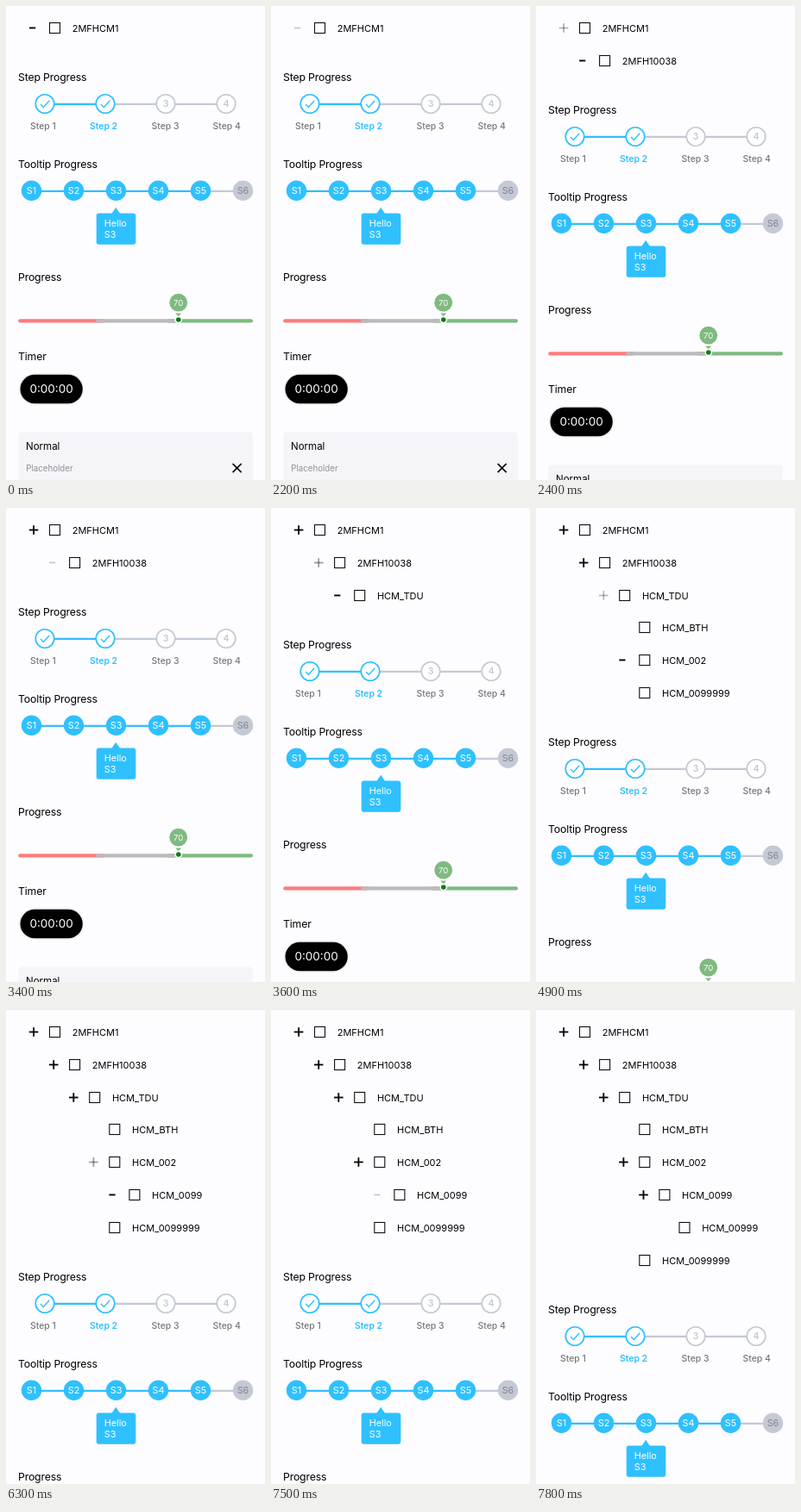
Recreate the animation shown at these times as an HTML page with a canvas. Size 300x550 px, loop 8 s.

```html
<!DOCTYPE html>
<html lang="en">
<head>
<meta charset="utf-8">
<title>Tree and progress widgets</title>
<style>
html, body { margin: 0; width: 100%; height: 100%; overflow: hidden; background: #fdfcff; }
canvas { display: block; width: 300px; height: 550px; }
</style>
</head>
<body>
<canvas id="stage"></canvas>
<script>
const W = 300, H = 550, LOOP = 8000, STEP = 100;
const ROW = 37.8, INDENT = 23.1;
const BG = '#fdfcff', BLUE = '#2fc0ff', GRAY = '#c4c9d6', GREEN = '#7fba80';

const canvas = document.getElementById('stage');
const ctx = canvas.getContext('2d');
const dpr = window.devicePixelRatio || 1;
canvas.width = W * dpr;
canvas.height = H * dpr;

// Depth-first tree; press dims the sign, open reveals the children.
const tree = [
  { label: '2MFHCM1', level: 0, shown: 0, press: 2200, fade: 2340, open: 2400 },
  { label: '2MFH10038', level: 1, shown: 2400, press: 3400, fade: 3515, open: 3600 },
  { label: 'HCM_TDU', level: 2, shown: 3600, press: 4800, fade: 4850, open: 4900 },
  { label: 'HCM_BTH', level: 3, shown: 4900 },
  { label: 'HCM_002', level: 3, shown: 4900, press: 6100, fade: 6215, open: 6300 },
  { label: 'HCM_0099', level: 4, shown: 6300, press: 7500, fade: 7550, open: 7600 },
  { label: 'HCM_00999', level: 5, shown: 7600 },
  { label: 'HCM_0099999', level: 3, shown: 4900 }
];

function text(str, x, mid, size, color = '#000', weight = 400, align = 'left', spacing = 0) {
  ctx.font = `${weight} ${size}px Inter, Roboto, sans-serif`;
  ctx.letterSpacing = spacing + 'px';
  ctx.textAlign = align;
  ctx.fillStyle = color;
  ctx.fillText(str, x, mid + size * 0.364);
}

function title(str, mid) {
  text(str, 14, mid, 12.3, '#000', 400, 'left', -0.18);
}

function rect(x, y, w, h, color, r = 0) {
  ctx.fillStyle = color;
  ctx.beginPath();
  ctx.roundRect(x, y, w, h, r);
  ctx.fill();
}

function disc(x, y, r, color) {
  ctx.fillStyle = color;
  ctx.beginPath();
  ctx.arc(x, y, r, 0, Math.PI * 2);
  ctx.fill();
}

function path(points, color, width) {
  ctx.beginPath();
  for (const [x, y] of points) ctx.lineTo(x, y);
  if (width) {
    ctx.strokeStyle = color;
    ctx.lineWidth = width;
    ctx.stroke();
  } else {
    ctx.fillStyle = color;
    ctx.fill();
  }
}

function signAlpha(node, t) {
  if (t < node.press) return 1;
  const p = Math.min(1, Math.max(0, (t - node.fade) / 250));
  const eased = p < 0.5 ? 2 * p * p : 1 - 2 * (1 - p) ** 2;
  return 0.2 + 0.8 * eased;
}

function drawRow(node, index, t) {
  const x = node.level * INDENT;
  const y = 25.5 + Math.round(index * ROW);
  if (node.open) {
    ctx.globalAlpha = signAlpha(node, t);
    if (t < node.open) {
      rect(x + 27, y - 1, 7.2, 1.9, '#000');
    } else {
      rect(x + 26.8, y - 0.9, 10.6, 1.8, '#000');
      rect(x + 31.2, y - 5.3, 1.8, 10.6, '#000');
    }
    ctx.globalAlpha = 1;
  }
  ctx.strokeStyle = '#111';
  ctx.lineWidth = 1.1;
  ctx.strokeRect(x + 50.5, y - 6, 12, 12);
  text(node.label, x + 76.7, y + 0.4, 11);
}

function drawSteps() {
  title('Step Progress', 83);
  const labelX = [28, 97, 168.5, 239.5];
  for (let i = 0; i < 4; i++) {
    const x = 45 + i * 70, y = 113.5, done = i < 2;
    const color = done ? BLUE : GRAY;
    if (i < 3) rect(x + 11, y - 0.7, 48, 2.3, i < 1 ? BLUE : GRAY);
    disc(x, y, 11.6, color);
    disc(x, y, 9.9, '#fff');
    if (done) path([[x - 5, y + 0.6], [x - 1.6, y + 4], [x + 5.2, y - 3.8]], BLUE, 1.4);
    else text(String(i + 1), x, y, 10.5, GRAY, 600, 'center');
    const active = i === 1;
    text('Step ' + (i + 1), labelX[i], 139.3, 10.4, active ? BLUE : '#77777b', active ? 600 : 500);
  }
}

function drawTooltip() {
  title('Tooltip Progress', 184);
  const y = 214.2;
  rect(29.5, y - 0.5, 196, 2.3, BLUE);
  rect(225.5, y - 0.5, 49, 2.3, GRAY);
  for (let i = 0; i < 6; i++) {
    const x = 29.5 + i * 49, last = i === 5;
    disc(x, y, 11.7, last ? GRAY : BLUE);
    text('S' + (i + 1), x, y, 10.8, last ? '#85858a' : '#fff', 400, 'center');
  }
  path([[122.3, 241], [127.2, 233.8], [132.1, 241]], BLUE);
  rect(104.7, 240.4, 45.6, 36.4, BLUE, 3);
  text('Hello', 113.7, 252, 10.8, '#fff');
  text('S3', 113.7, 265.3, 10.8, '#fff');
}

function drawProgress() {
  title('Progress', 315);
  rect(14.2, 363.2, 100, 4.3, '#fb7d7e', 2.1);
  rect(186, 363.2, 100, 4.3, GREEN, 2.1);
  rect(104.5, 363.2, 95.3, 4.3, '#bcbabd');
  disc(199.7, 344.2, 10.4, GREEN);
  text('70', 199.7, 344.2, 9.5, '#fff', 400, 'center');
  path([[196.2, 356.6], [203.2, 356.6], [199.7, 360.2]], GREEN);
  disc(199.8, 364, 4.3, '#fff');
  disc(199.8, 364, 2.8, '#0b7d12');
}

function drawTimer() {
  title('Timer', 406.5);
  rect(14.6, 426, 76, 37, '#f0eff0', 18.5);
  rect(16.5, 427.8, 72.3, 33.4, '#000', 16.7);
  text('0:00:00', 52.6, 444.5, 13.5, '#fff', 400, 'center');
}

function drawCard() {
  rect(14.2, 494.5, 271.8, 80, '#f5f4f9', 4);
  text('Normal', 23, 510.7, 11.5);
  text('Placeholder', 23.3, 536, 9.7, '#919196');
  path([[262.6, 531.2], [272.6, 541.2]], '#000', 1.7);
  path([[272.6, 531.2], [262.6, 541.2]], '#000', 1.7);
}

function draw(t) {
  ctx.setTransform(dpr, 0, 0, dpr, 0, 0);
  rect(0, 0, W, H, BG);
  const rows = tree.filter(node => t >= node.shown);
  rows.forEach((node, i) => drawRow(node, i, t));
  ctx.translate(0, Math.round((rows.length - 1) * ROW));
  drawSteps();
  drawTooltip();
  drawProgress();
  drawTimer();
  drawCard();
}

const start = performance.now();
function frame() {
  const t = (performance.now() - start) % LOOP;
  draw(Math.floor(t / STEP) * STEP);
  requestAnimationFrame(frame);
}
frame();
</script>
</body>
</html>
```
